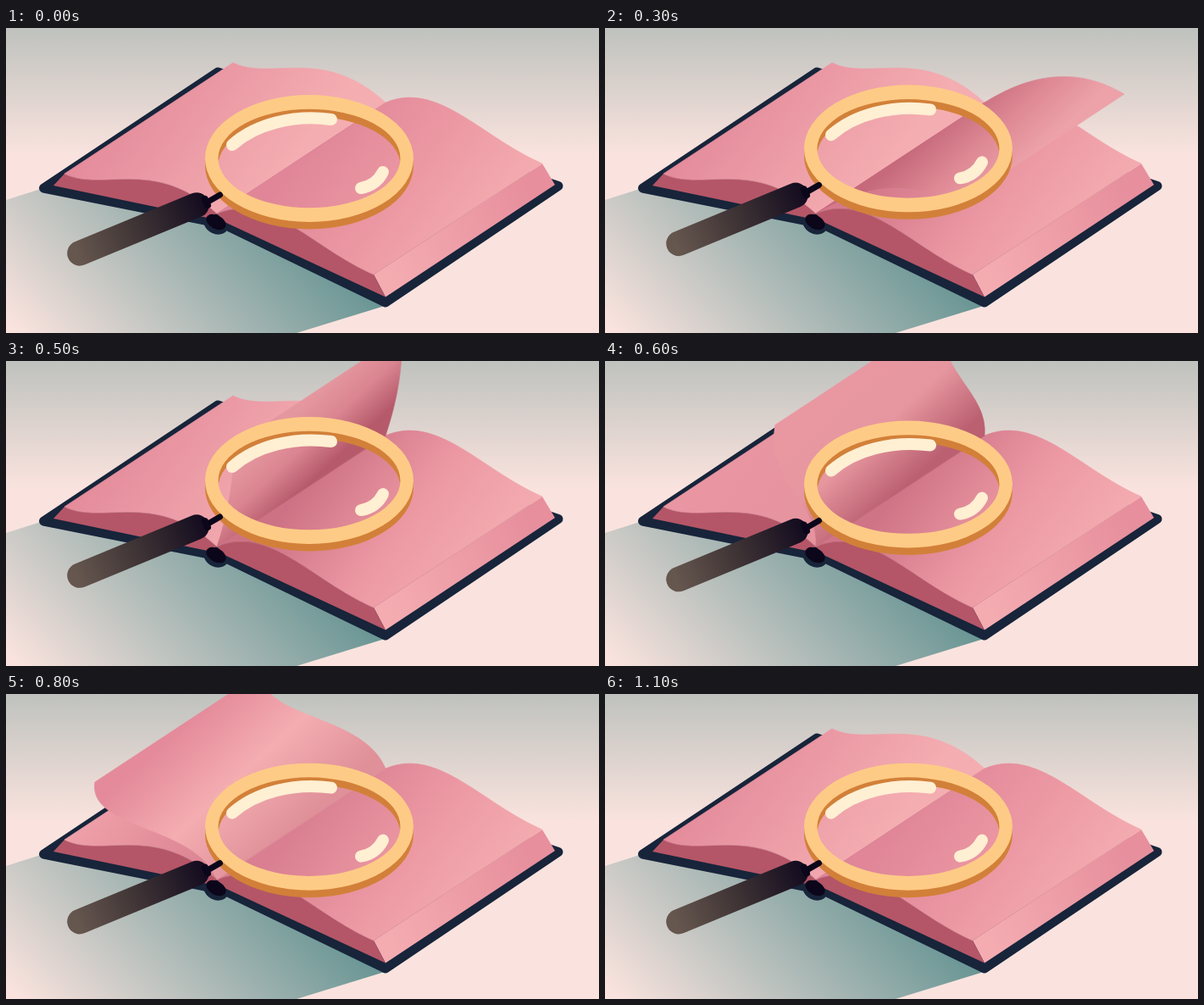
These frames come from a looping animation (700 by 360 pixels, 1200 ms). An HTML page with a canvas:

```html
<!DOCTYPE html>
<html lang="en">
<head>
<meta charset="utf-8">
<title>Book and magnifier</title>
<style>
  html, body { margin: 0; width: 100%; height: 100%; overflow: hidden; background: #fae3de; }
  canvas { display: block; width: 700px; height: 360px; }
</style>
</head>
<body>
<canvas id="stage" width="700" height="360"></canvas>
<script>
const ctx = document.getElementById('stage').getContext('2d');
const LOOP = 1200, STEP = 100;

// Far and near ends of the spine; each page is a curve swept between them.
const FAR = [448, 88], NEAR = [249, 219];
const NAVY = '#17243a', RED = '#b45667', INK = '#0c061a';
const LIGHT = '#f4adb1', PINK = '#ec98a3', ROSE = '#e08698', DARK = '#b65a6b';

// Page curves relative to the spine: two controls and the free edge.
const RIGHT = [62, -26, 112, 40, 185, 72];
const LEFT = [-73, -68, -136, -25, -180, -47];
const POSES = [
  { t: 0, c: RIGHT },
  { t: 200, c: [40, -26, 100, -18, 183, 33] },
  { t: 300, c: [32, -20, 95, -52, 165, -10] },
  { t: 500, c: [11, -33, 21, -75, 19, -119] },
  { t: 700, c: [-4, -69, -134, -69, -105, -146] },
  { t: 900, c: [-50, -60, -150, -45, -169, -77] },
  { t: 1100, c: LEFT }
];

const clamp = v => Math.min(1, Math.max(0, v));
const smooth = v => v * v * (3 - 2 * v);
const bump = (t, from, to) => Math.sin(Math.PI * clamp((t - from) / (to - from)));
const wave = (t, peak, period) => Math.cos(2 * Math.PI * (t - peak) / period);

function mix(a, b, k) {
  const part = (s, i) => parseInt(s.slice(i, i + 2), 16);
  return '#' + [1, 3, 5].map(i =>
    Math.round(part(a, i) + (part(b, i) - part(a, i)) * k).toString(16).padStart(2, '0')).join('');
}

// Smooth curve through the poses; the page starts and ends at rest.
function poseAt(t) {
  const i = Math.max(0, POSES.findIndex(p => p.t > t) - 1);
  const a = POSES[i], b = POSES[i + 1], h = b.t - a.t, u = (t - a.t) / h;
  const slope = (n, j) => {
    const p = POSES[n - 1], q = POSES[n + 1];
    return p && q ? (q.c[j] - p.c[j]) / (q.t - p.t) : 0;
  };
  return a.c.map((v, j) => v + (b.c[j] - v) * smooth(u) +
    h * u * (1 - u) * ((1 - u) * slope(i, j) - u * slope(i + 1, j)));
}

function gradient(x0, y0, x1, y1, colors) {
  const g = ctx.createLinearGradient(x0, y0, x1, y1);
  colors.forEach((c, i) => g.addColorStop(i / (colors.length - 1), c));
  return g;
}

function fillPoly(points, fill) {
  ctx.beginPath();
  points.forEach(([x, y]) => ctx.lineTo(x, y));
  ctx.closePath();
  ctx.fillStyle = fill;
  ctx.fill();
}

function strokePath(d, width, color) {
  ctx.lineWidth = width;
  ctx.lineCap = ctx.lineJoin = 'round';
  ctx.strokeStyle = color;
  ctx.stroke(new Path2D(d));
}

function oval(x, y, rx, ry, angle, fill) {
  ctx.beginPath();
  ctx.ellipse(x, y, rx, ry, angle, 0, Math.PI * 2);
  ctx.fillStyle = fill;
  ctx.fill();
}

function curveOut([x, y], c) {
  ctx.bezierCurveTo(x + c[0], y + c[1], x + c[2], y + c[3], x + c[4], y + c[5]);
}

function page(c, fill) {
  const [x, y] = NEAR;
  ctx.beginPath();
  ctx.moveTo(...FAR);
  curveOut(FAR, c);
  ctx.lineTo(x + c[4], y + c[5]);
  ctx.bezierCurveTo(x + c[2], y + c[3], x + c[0], y + c[1], x, y);
  ctx.closePath();
  ctx.fillStyle = ctx.strokeStyle = fill;
  ctx.fill();
  // A hairline of the same colour closes the seams between neighbours.
  ctx.lineWidth = 0.7;
  ctx.stroke();
}

function front(c, corner, foot) {
  ctx.beginPath();
  ctx.moveTo(...NEAR);
  curveOut(NEAR, c);
  ctx.lineTo(...corner);
  ctx.lineTo(...foot);
  ctx.closePath();
  ctx.fillStyle = RED;
  ctx.fill();
}

function backdrop() {
  ctx.fillStyle = gradient(0, 0, 0, 150, ['#bfc2be', '#fae3de']);
  ctx.fillRect(0, 0, 700, 360);
  fillPoly([[0, 203], [44, 189], [300, 200], [447, 328], [343, 360], [0, 360]],
    gradient(20, 365, 270, 120, ['#fae3de', '#5f908f']));
}

function book(t, upright) {
  const cover = 'M44.5 189L250 52L320 75L652 186.5L448 324L262 234L240 228Z';
  ctx.fillStyle = NAVY;
  ctx.fill(new Path2D(cover));
  strokePath(cover, 11, NAVY);
  oval(248, 231, 15, 12, 0.45, NAVY);

  // The turning page shades whichever side it hangs low over.
  const overRight = bump(t, 0, 300), overLeft = bump(t, 500, 1100);

  front(LEFT, [56, 186], [238, 224]);
  page(LEFT, gradient(110, 95, 286, 227,
    [mix('#e3899a', '#f1a3ab', overLeft), mix(LIGHT, '#d4798a', overLeft)]));

  fillPoly([[633, 160], [648, 185], [448, 317.5], [434, 291]],
    gradient(450, 290, 625, 205, ['#f4acb1', '#e78f9d']));
  front(RIGHT, [448, 317.5], [258, 229]);
  page(RIGHT, gradient(349, 150, 541, 294, [
    mix(ROSE, DARK, 0.45 * upright),
    mix(PINK, ROSE, 0.8 * overRight),
    mix(LIGHT, ROSE, 0.6 * overRight)
  ]));

  oval(248, 229, 12.5, 8, 0.5, INK);
}

function turningPage(t, upright) {
  if (t === 0 || t >= 1100) return;
  const c = poseAt(t);
  const over = smooth(clamp((t - 400) / 400));
  const back = upright * (1 - over);
  const colors = [
    mix(mix(ROSE, LIGHT, over), DARK, upright),
    mix(mix(PINK, LIGHT, over), DARK, 0.4 * back),
    mix(mix(LIGHT, '#e48a9a', over), DARK, 0.3 * back * back)
  ];
  // Shade across the page, from the spine to the free edge.
  const nx = 0.68, ny = 0.73;
  const d = c[4] * nx + c[5] * ny;
  const reach = Math.sign(d) * Math.max(70, Math.abs(d));
  page(c, gradient(349, 153, 349 + nx * reach, 153 + ny * reach, colors));
}

function ring(y, color) {
  ctx.beginPath();
  ctx.ellipse(358, y, 123, 75, 0, 0, Math.PI * 2);
  ctx.moveTo(465.5, y);
  ctx.ellipse(358, y, 107.5, 58.3, 0, 0, Math.PI * 2);
  ctx.fillStyle = color;
  ctx.fill('evenodd');
}

function magnifier(t) {
  ctx.save();
  ctx.translate(0, 9.3 * wave(t, 990, LOOP) + 1.4 * wave(t, 180, LOOP / 2) - 3.8);
  ring(162.5, '#d28039');
  ctx.fillRect(235, 154, 15.5, 8.5);
  ctx.fillRect(465.5, 154, 15.5, 8.5);
  ring(154, '#fecb86');
  strokePath('M267 138C295 113 340 102 384 108', 14, '#ffefd3');
  strokePath('M419 189Q437 186 445 170', 14, '#ffefd3');

  strokePath('M236 206.5L252.5 197', 7, INK);
  strokePath('M87 266L225 209', 29.5,
    gradient(85, 267, 232, 206, ['#65564e', '#3d3234', '#150d20']));
  strokePath('M235 202L238 209', 8, INK);
  ctx.restore();
}

function draw(now) {
  const t = Math.floor(now % LOOP / STEP) * STEP;
  const upright = bump(t, 0, 1000) ** 2;
  backdrop();
  book(t, upright);
  turningPage(t, upright);
  magnifier(t);
}

const start = performance.now();
function tick() {
  draw(performance.now() - start);
  requestAnimationFrame(tick);
}
tick();
</script>
</body>
</html>
```
